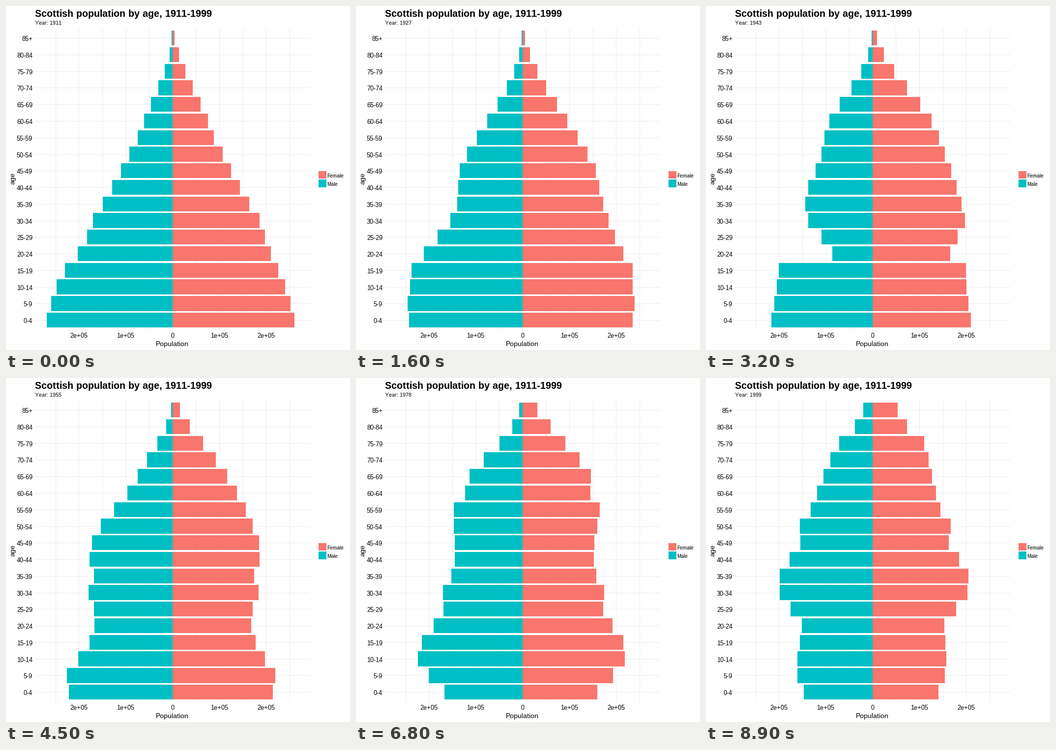
A matplotlib script that plays this animation: 700 by 700 pixels, repeating every 10 s.

```python
import numpy as np
import matplotlib.pyplot as plt
from matplotlib.animation import FuncAnimation
from matplotlib.patches import Rectangle

plt.rcParams.update({
    "font.family": "Liberation Sans",
    "text.hinting": "native",
    "text.hinting_factor": 1,
    "text.kerning_factor": 6,
})

SIZE = 700
ZERO = 339              # pixel column where both sexes meet
MID, TICK = 338.75, 47.6
STEP = 33.76            # distance between age bands
FIRST, LAST = 1911, 1999
FRAMES, MOVING = 100, 89
PINK, TEAL, GRID = "#F8766D", "#00BFC4", "#EBEBEB"

AGES = [f"{a}-{a + 4}" for a in range(0, 85, 5)] + ["85+"]
BANDS = np.arange(len(AGES))

# Adult size of a cohort, in pixels, by year of birth
COHORTS = np.array([
    (1840, 93), (1856, 102), (1866, 123), (1881, 159), (1891, 163), (1911, 187),
    (1915, 186), (1919, 163), (1924, 180), (1928, 164), (1933, 153), (1938, 148),
    (1945, 152), (1949, 168), (1954, 160), (1958, 176), (1964, 197), (1969, 194),
    (1979, 146), (1989, 150), (1994, 147), (1999, 134),
])


def people(year, extra, mode):
    """Bar lengths from cohort size, early losses and old-age mortality."""
    born = year - 5 * BANDS
    adults = np.interp(born, *COHORTS.T)
    # children who will later die or leave, fewer for recent births
    surplus = 0.33 * np.clip((1980 - born) / 35, 0, 1) + extra
    half = 2.5 + 3 * np.exp(-(year - FIRST) / 15)
    young = 1 / (1 + (BANDS / half) ** 3)
    alive = np.exp(-np.exp((BANDS - mode) / 2.3))
    return adults * (1 + surplus * young) * alive


def at_home(year, peak, reach):
    """Share of each band not away in the forces during the 1940s."""
    war = np.interp(year, [1939, 1943, 1945, 1947], [0, 1, 1, 0])
    return 1 - war * peak * np.exp(-(BANDS - 4) / reach) * (BANDS >= 4)


def female(year):
    t = (year - FIRST) / (LAST - FIRST)
    return people(year, 0, 14.4 + 2 * t ** 1.4) * at_home(year, 0.18, 0.5)


def male(year):
    t = (year - FIRST) / (LAST - FIRST)
    born = year - 5 * BANDS
    share = 0.98 - 0.08 * np.clip((1897 - born) / 10, 0, 1)
    fallen = 0.15 * np.interp(year, [1914, 1919], [0, 1])
    share *= 1 - fallen * np.exp(-((born - 1895) / 8) ** 2)
    return share * people(year, 0.07, 13.8 + 1.3 * t ** 2.5) * at_home(year, 0.62, 3)


fig = plt.figure(figsize=(SIZE / 72, SIZE / 72), dpi=72, facecolor="white")
ax = fig.add_axes([0, 0, 1, 1])
ax.set_xlim(0, SIZE)
ax.set_ylim(SIZE, 0)
ax.axis("off")


def box(x, y, w, h, color):
    return ax.add_patch(Rectangle((x, y), w, h, fc=color, lw=0, antialiased=False))


def label(x, y, text, size, va="baseline", **kw):
    return ax.text(x, y, text, fontsize=size, color="black", va=va, **kw)


# Grid and axis labels
for k in range(-5, 6):
    x = MID + TICK * k
    box(round(x), 45, 1, 614, GRID)
    if k % 2 == 0:
        label(x, 675, f"{abs(k) // 2}e+05" if k else "0", 13, ha="center")

spans = []
for b, age in enumerate(AGES):
    drop = STEP * (len(AGES) - 1 - b)
    box(59, round(65.2 + drop), 560, 1, GRID)
    label(54, round(71.2 + drop), age, 13, ha="right")
    top = round(50 + drop)
    spans.append((top, round(80.35 + drop) - top))

label(59, 22, "Scottish population by age, 1911-1999", 20, weight="bold")
subtitle = label(59, 38, "", 11)
label(MID, 692, "Population", 14, ha="center")
label(20, 351, "age", 14, va="center", ha="right", rotation=90)

# Legend
for k, (color, name) in enumerate([(PINK, "Female"), (TEAL, "Male")]):
    y = 336.1 + 17.28 * k
    box(636, round(y), 16, round(y + 15.3) - round(y), color)
    label(653, round(y) + 13, name, 11)

right = [box(ZERO, y, 0, h, PINK) for y, h in spans]
left = [box(ZERO, y, 0, h, TEAL) for y, h in spans]


def draw(i):
    year = FIRST + (LAST - FIRST) * min(i / MOVING, 1)
    subtitle.set_text(f"Year: {round(year)}")
    for bar, w in zip(right, np.rint(female(year))):
        bar.set_width(w)
    for bar, w in zip(left, np.rint(male(year))):
        bar.set_x(ZERO - w)
        bar.set_width(w)
    return [subtitle, *right, *left]


anim = FuncAnimation(fig, draw, frames=FRAMES, interval=100, repeat=True, repeat_delay=0)
plt.show()
```
